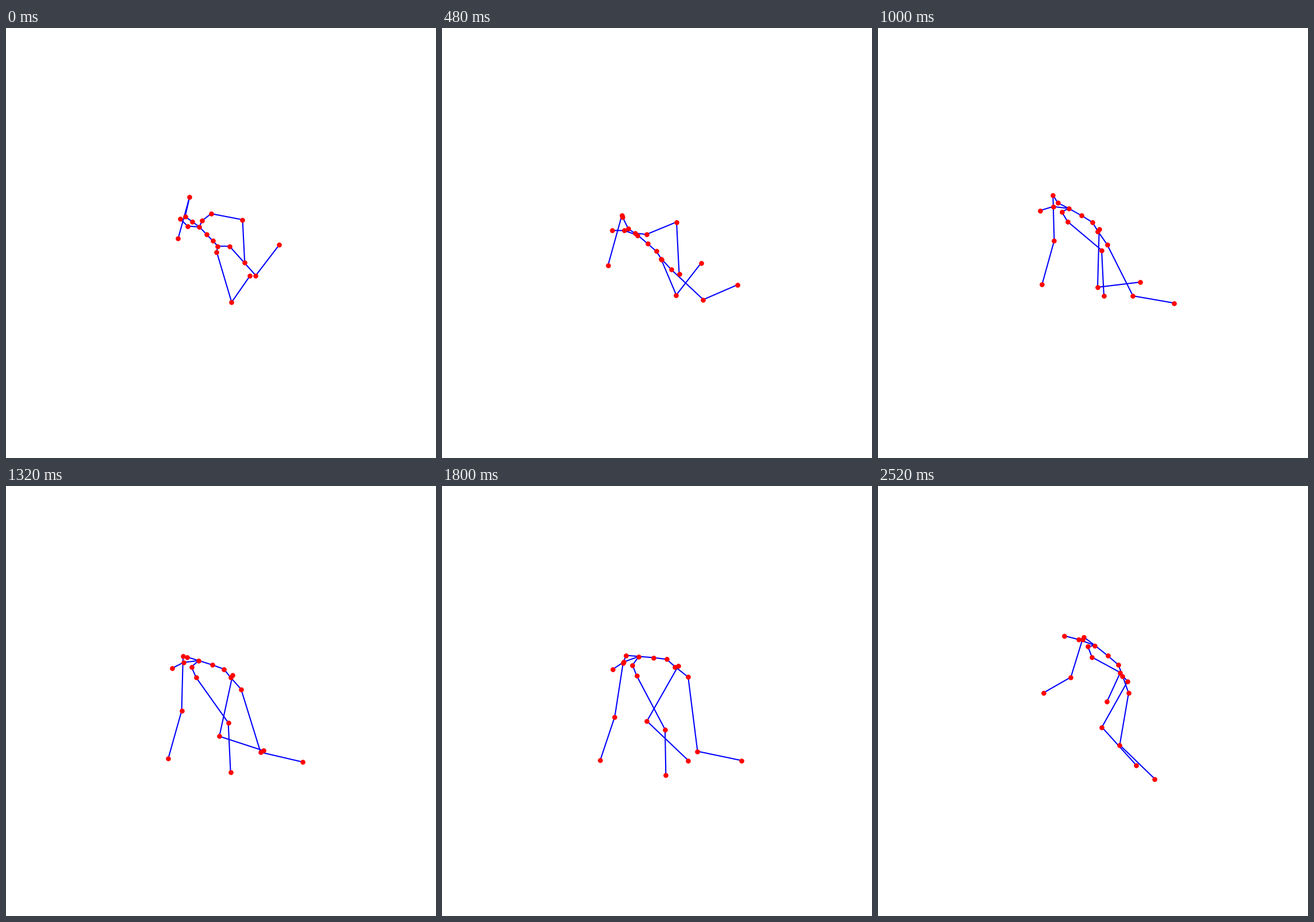
Write a matplotlib script that moves like this. It is 748 px wide and 748 px high and loops after 2.56 s.

```python
import numpy as np
import matplotlib.pyplot as plt
from matplotlib.animation import FuncAnimation

SIZE, DPI = 748, 88
PX = 72 / DPI  # points per pixel
FRAMES, STEP_MS = 64, 40
KEYS = np.array([0, 12, 25, 45, 54, 63])
t = np.arange(FRAMES)


# Positions are complex numbers x + yj, with y pointing down.
def path(*points):
    """Smooth path through one point per key time."""
    pos = np.array(points)
    vel = np.gradient(pos, KEYS)
    i = np.clip(np.searchsorted(KEYS, t, side="right") - 1, 0, len(KEYS) - 2)
    span = KEYS[i + 1] - KEYS[i]
    u = (t - KEYS[i]) / span
    return ((1 + 2 * u) * (1 - u) ** 2 * pos[i] + u * (1 - u) ** 2 * span * vel[i]
            + u ** 2 * (3 - 2 * u) * pos[i + 1] + u ** 2 * (u - 1) * span * vel[i + 1])


def turn(angle):
    return np.exp(1j * angle)


# The torso is led by the pelvis and the neck; the back arches in between
root = path(369 + 380j, 382 + 402j, 383 + 354j, 406 + 315j, 411 + 310j, 426 + 331j)
neck = path(337 + 346.5j, 341 + 361j, 332.5 + 314.5j, 343 + 297j, 339.5 + 279j, 378 + 278j)
torso = neck - root
arch = 0.13 * np.sin(np.pi * t / 90)
waist = root + torso * (0.27 + 1j * arch)
chest = root + torso * (0.61 + 0.6j * arch)

# The head drops mid-way and its nod fades out
head = 0.78 * torso * turn(-0.42 - 0.35 * np.sin(np.pi * t / 70))
nod = 0.03 * (t - 6) * np.exp(-t / 15)
skull = neck + head * (0.54 + 1j * nod)
crown = neck + head

# Shoulders and hips turn with the torso
shoulder_a = neck + 0.34 * torso * turn(-0.19)
upper_a = shoulder_a + 0.15 * t - 12 - 1j * (3 + 18 * np.cos(np.pi * (t - 14) / 36))
shoulder_b = neck + torso * (0.1 + 1j * (0.5 * (t / 42 - 1) ** 2 - 0.27))
upper_b = shoulder_b + 20 * turn(0.2 + np.tanh((t - 13) / 10))
hip_l = root + 0.17 * t - 2 + 1j * (14 * (t / 32 - 1) ** 2 - 4)
hip_r = root - 0.44 * torso * turn(0.4 - 1.2 * np.exp(-t / 10))

# Forearms hang down with a fading bounce, then fold up at the end
fold = (t / (FRAMES - 1)) ** 8
reach = 84 - 9 * np.cos(np.pi * t / 12) * np.exp(-t / 40) - 30 * fold


def wrist(elbow, tilt, lift):
    return elbow + 1j * reach * turn(tilt + lift * fold)


elbow_a = path(320 + 294j, 313.5 + 326j, 307 + 370.5j, 301 + 402j, 286 + 381j, 336 + 333j)
elbow_b = path(412 + 334j, 408.5 + 338j, 389.5 + 387j, 388.5 + 424j, 385 + 392.5j, 422 + 325j)
wrist_a = wrist(elbow_a, 0.27, 0.78)
wrist_b = wrist(elbow_b, -0.05, 0.48)

knee_l = path(393 + 477.5j, 408 + 465j, 382.5 + 451.5j, 357 + 409.5j, 342 + 395j, 390 + 420j)
knee_r = path(435 + 431j, 455 + 473j, 444 + 466.5j, 445 + 462j, 442 + 464j, 421 + 451j)
ankle_l = path(425 + 431.5j, 451.5 + 409j, 457 + 442.5j, 429 + 478j, 422 + 475.5j, 450 + 486.5j)
ankle_r = path(476 + 377.5j, 515 + 447j, 516 + 479j, 521.5 + 478j, 530 + 493j, 481.5 + 510j)
ankle_r = ankle_r + 36 * np.exp(-((t - 59) / 1.9) ** 2)  # push-off flick

CHAINS = [np.array(chain) for chain in (
    (root, waist, chest, neck, skull, crown),
    (neck, shoulder_a, upper_a, elbow_a, wrist_a),
    (neck, shoulder_b, upper_b, elbow_b, wrist_b),
    (root, hip_l, knee_l, ankle_l),
    (root, hip_r, knee_r, ankle_r),
)]
JOINTS = np.vstack([CHAINS[0]] + [chain[1:] for chain in CHAINS[1:]])

fig = plt.figure(figsize=(SIZE / DPI, SIZE / DPI), dpi=DPI, facecolor="white")
ax = fig.add_axes([0, 0, 1, 1])
ax.set(xlim=(0.5, SIZE + 0.5), ylim=(SIZE + 0.5, 0.5))
ax.axis("off")

bones = [ax.plot([], [], color="blue", lw=2.08 * PX, solid_joinstyle="round", zorder=1)[0]
         for _ in CHAINS]
dots, = ax.plot([], [], "o", color="red", ms=8.6 * PX, mew=0, zorder=2)


def draw(frame):
    for artist, points in zip([*bones, dots], [*CHAINS, JOINTS]):
        pose = points[:, frame]
        artist.set_data(pose.real, pose.imag)
    return [*bones, dots]


anim = FuncAnimation(fig, draw, frames=FRAMES, interval=STEP_MS, repeat=True, repeat_delay=0)
plt.show()
```
